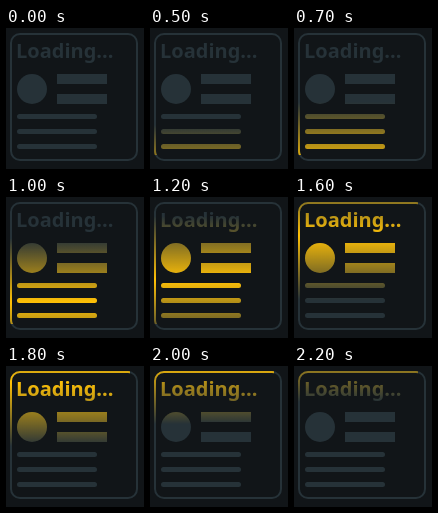
Animation, 138 px wide and 141 px high, one loop 2300 ms. Source, as an HTML page:

```html
<!DOCTYPE html>
<html lang="en">
<head>
<meta charset="utf-8">
<title>Loading card</title>
<style>
  html, body { margin: 0; width: 100%; height: 100%; overflow: hidden; background: #111518; }
  svg { display: block; width: 138px; height: 141px; }
  text { font: 700 20px "Noto Sans", "Open Sans", sans-serif; }
  .base { color: #263238; }
  .cut { color: #fff; }
  .band { animation: rise 2300ms steps(23) infinite; }
  @keyframes rise {
    from { transform: translateY(152px); }
    to { transform: translateY(-103px); }
  }
</style>
</head>
<body>
<svg viewBox="0 0 138 141">
  <defs>
    <linearGradient id="glow" x2="0" y2="1">
      <stop offset="0" stop-color="#ffc107" stop-opacity="0"/>
      <stop offset=".5" stop-color="#ffc107"/>
      <stop offset="1" stop-color="#ffc107" stop-opacity="0"/>
    </linearGradient>
    <mask id="shapes" maskUnits="userSpaceOnUse" width="138" height="141">
      <use href="#card" class="cut"/>
    </mask>
  </defs>
  <g class="base">
    <g id="card" fill="currentColor">
      <rect x="5" y="6" width="126" height="126" rx="9" fill="none" stroke="currentColor" stroke-width="2"/>
      <text x="10" y="30">Loading...</text>
      <circle cx="26" cy="61" r="15"/>
      <rect x="51" y="46" width="50" height="10"/>
      <rect x="51" y="66" width="50" height="10"/>
      <rect x="11" y="86" width="80" height="5" rx="2.5"/>
      <rect x="11" y="101" width="80" height="5" rx="2.5"/>
      <rect x="11" y="116" width="80" height="5" rx="2.5"/>
    </g>
  </g>
  <g mask="url(#shapes)">
    <rect class="band" width="138" height="128" fill="url(#glow)"/>
  </g>
</svg>
</body>
</html>
```
